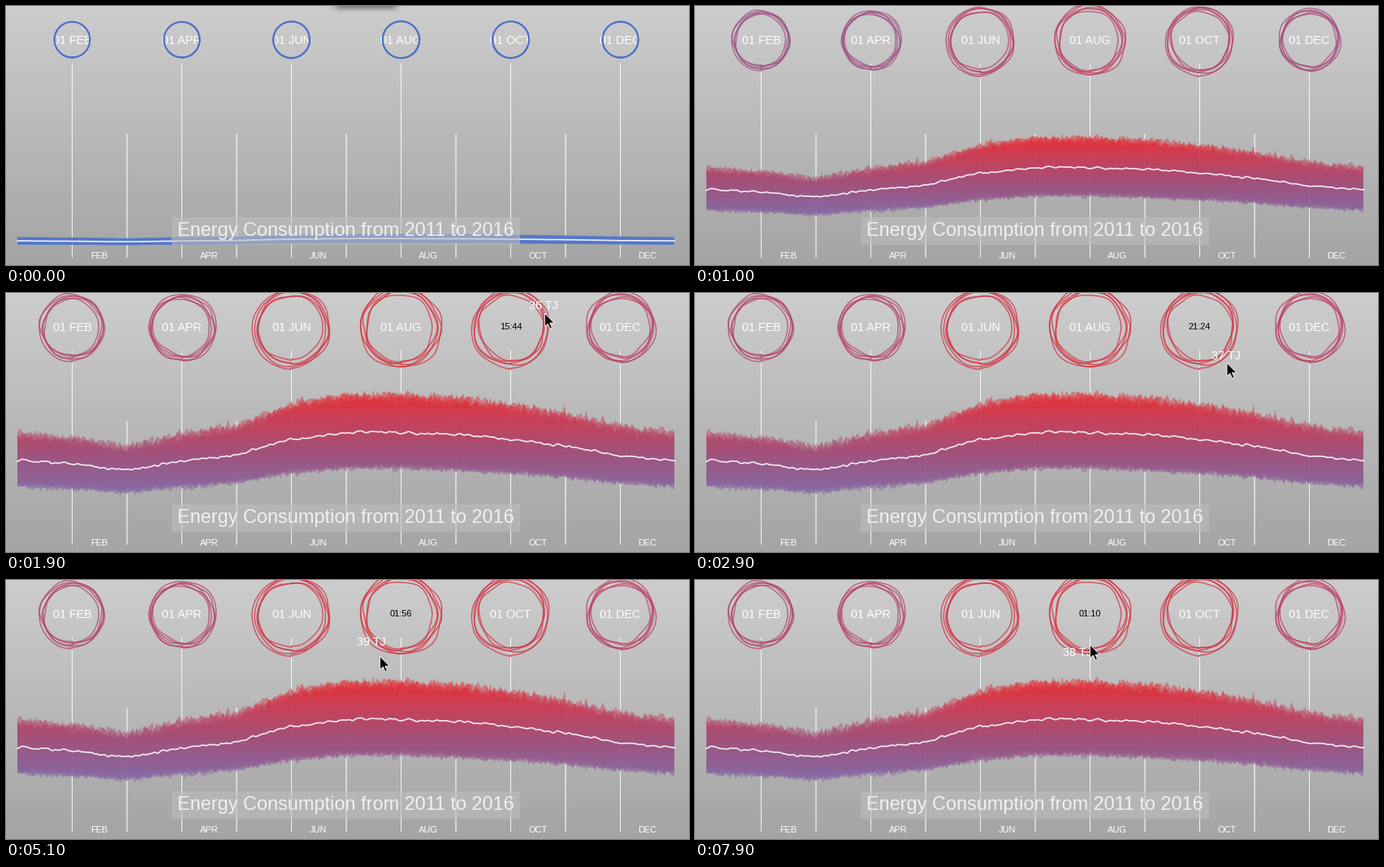
Recreate the animation shown at these times as a matplotlib script. Size 841x320 px, loop 8000 ms.

```python
import numpy as np
import matplotlib.pyplot as plt
from matplotlib.animation import FuncAnimation
from matplotlib.patches import Polygon, Rectangle

W, H, DPI = 841, 320, 64
STEP, FRAMES = 100, 80
YEARS = 5
BASE = 298            # zero level of the chart
LEFT, RIGHT = 14, 823.5
RING_Y, RING_R = 41.5, 19
MONTHS = ["FEB", "APR", "JUN", "AUG", "OCT", "DEC"]
RING_X = 81.5 + 135 * np.arange(6)

rng = np.random.default_rng(11)
plt.rcParams["font.family"] = "Liberation Sans"

fig = plt.figure(figsize=(W / DPI, H / DPI), dpi=DPI)
ax = fig.add_axes([0, 0, 1, 1])
ax.axis("off")


def px(n):
    return n * 72 / DPI


def label(x, y, s, size, color="white", z=6):
    return ax.text(x, y, s, fontsize=px(size), color=color, ha="center",
                   va="baseline", zorder=z)


def picture(data, z):
    return ax.imshow(data, extent=(0, W, H, 0), interpolation="nearest",
                     aspect="auto", zorder=z)


def rule(x, top, width):
    ax.plot([x, x], [top, 311], color="white", lw=px(width), alpha=0.9,
            zorder=2, snap=False, solid_capstyle="butt")


def ramp(v, stops, colors):
    c = np.array(colors) / 255
    return np.stack([np.interp(v, stops, c[:, i]) for i in range(3)], -1)


# backdrop with a soft shadow at the top edge
col, row = np.meshgrid(np.arange(W) + 0.5, np.arange(H) + 0.5)
picture(np.dstack([np.interp(row, [0, H], [205, 164]) / 255] * 3), 0)
side = np.clip((np.abs(col - 443) - 32) / 18, 0, 1)
dark = 0.34 * np.exp(-(row / 5) ** 2) * (1 - side) ** 2
shadow = picture(np.dstack([0 * dark] * 3 + [dark]), 1)

# grid, month names and title
for x, month in zip(RING_X, MONTHS):
    rule(x, 71, 1)
    if month != "DEC":
        rule(x + 67.5, 158, 1.2)
    label(x + 33.5, 312, month, 11)
ax.add_patch(Rectangle((204, 261), 429, 34, fc="#bebebe", alpha=0.58, lw=0,
                       zorder=5))
label(418.5, 284, "Energy Consumption from 2011 to 2016", 23.55, "#f0f0f0")

# mean level per month, and daily ranges around it
LEVELS = [91, 87, 79, 90, 98, 117, 126, 126, 123, 117, 109, 97, 91]


def mean_level(x):
    return np.interp(x, np.linspace(LEFT, RIGHT, len(LEVELS)), LEVELS)


days = np.linspace(LEFT, RIGHT, 365)
cols = np.arange(W) + 0.5


def edge(scale, shift, rough):
    noise = rng.normal(0, rough, days.size)
    return np.interp(cols, days, scale * mean_level(days) + shift + noise)


tops = [edge(1.36, 2.5 - 2.2 * i, 2.8) for i in range(YEARS)]
lows = [edge(0.645, 1.3 * i - 1, 1.8) for i in range(YEARS)]
wobble = np.convolve(rng.normal(0, 1.3, days.size), [0.25, 0.5, 0.25], "same")
mid = mean_level(days) + wobble

band = picture(np.zeros((H, W, 4)), 3)
mean_line, = ax.plot([], [], color="white", lw=px(1.7), alpha=0.88, zorder=4)
inside = (cols > LEFT) & (cols < RIGHT)
BLUE = np.array([78, 116, 203]) / 255


def draw_band(k):
    pad = 2 * (1 - k)
    clear = np.ones((H, W))
    for top, low in zip(tops, lows):
        y0, y1 = BASE - k * top - pad, BASE - k * low + pad
        cover = np.clip(row + 0.5 - y0, 0, 1) * np.clip(y1 - row + 0.5, 0, 1)
        clear *= 1 - 0.42 * cover
    rgb = ramp((BASE - row) / k, [58, 102, 145, 174],
               [(134, 99, 160), (162, 74, 118), (206, 54, 78), (234, 36, 40)])
    cold = np.clip(1 - (k - 0.085) / 0.12, 0, 1)
    band.set_data(np.dstack([rgb * (1 - cold) + BLUE * cold,
                             (1 - clear) * inside]))
    mean_line.set_data(days, BASE - k * mid)


# daily rings, midnight at the bottom, clockwise
turn = np.linspace(0, 2 * np.pi, 145)
rings = []
for x in RING_X:
    gain = 0.212 * mean_level(x)
    for i in range(YEARS):
        off = 1.9 * (i - 2) + 1.4 * np.cos(turn) + rng.uniform(-2, 2) * (
            turn / np.pi - 1) / 2
        for n in range(1, 8):
            off = off + rng.uniform(0.4, 1.7) / n ** 0.5 * np.sin(
                n * turn + rng.uniform(0, 2 * np.pi))
        line, = ax.plot([], [], lw=px(1.5), alpha=0.75, zorder=5)
        rings.append((line, x, gain, off * gain / 23))


def draw_rings(k):
    for line, x, gain, off in rings:
        r = RING_R + 1.5 * (1 - k) + k * (gain + off)
        xs, ys = x - r * np.sin(turn), RING_Y + r * np.cos(turn)
        line.set_data(np.append(xs, xs[0]), np.append(ys, ys[0]))
        line.set_color(ramp(k * gain, [2, 7, 15, 26],
                            [(78, 112, 202), (118, 104, 178),
                             (160, 80, 130), (216, 48, 62)]))


names = [label(x, 47, "01 " + m, 14.4, z=4) for x, m in zip(RING_X, MONTHS)]
clock = label(0, 45, "", 11, "black")
amount = label(0, 0, "", 14.4, z=7)

ARROW = np.array([(0, 0), (0, 16.5), (3.8, 13), (6.6, 19), (9, 18),
                  (6.4, 12), (11.8, 12)])
cursor = Polygon(ARROW, closed=True, fc="black", ec="white", lw=px(0.8),
                 zorder=8)
ax.add_patch(cursor)

# time, angle in degrees from the bottom, distance from the ring's centre
ORBIT = [(1500, 219, 80), (1900, 248.5, 45), (2600, 301, 56), (4300, 427, 56),
         (4400, -50, 55), (5300, 48, 60), (6300, 157.7, 21), (7200, 271, 50),
         (7900, 360, 38.5)]
# time, lead of the clock in degrees, offset of the amount from the tip
LEAD = [(1900, -12.5, -1, -10), (4000, 9, -1.5, -9), (6300, -4, -21, -28),
        (7900, 17.5, -16, 9)]


def follow(t, keys):
    times, *tracks = np.array(keys).T
    return [np.interp(t, times, v) for v in tracks]


def growth(t):
    u = np.clip((t - 250) / 1230, 0, 1)
    ease = 4 * u ** 3 if u < 0.5 else 1 - 4 * (1 - u) ** 3
    return 0.085 + 0.915 * ease


def draw_pointer(t):
    near = MONTHS.index("OCT" if t < 4400 else "AUG")
    angle, r = follow(t, ORBIT)
    lead, dx, dy = follow(t, LEAD)
    x = RING_X[near] - r * np.sin(np.radians(angle))
    y = RING_Y + r * np.cos(np.radians(angle))
    hover = t >= 1500 and r < 70
    for i, name in enumerate(names):
        name.set_visible(not (hover and i == near))
    for part in (clock, amount):
        part.set_visible(hover)
    cursor.set_visible(t >= 1500)
    cursor.set_xy(ARROW + (x, y))

    hand = (angle + lead) % 360
    minutes = int(round(hand * 4)) % 1440
    clock.set_text(f"{minutes // 60:02d}:{minutes % 60:02d}")
    clock.set_x(RING_X[near])
    amount.set_text(f"{37.4 + 1.5 * np.cos(np.radians(hand - 70)):.0f} TJ")
    amount.set_position((x + dx, y + dy + 5))


ax.set_xlim(0, W)
ax.set_ylim(H, 0)


def update(n):
    t = n * STEP
    k = growth(t)
    shadow.set_visible(t < 300)
    draw_band(k)
    draw_rings(k)
    draw_pointer(t)
    return []


anim = FuncAnimation(fig, update, frames=FRAMES, interval=STEP,
                     init_func=lambda: update(0), repeat=True,
                     repeat_delay=0, blit=False)
plt.show()
```
